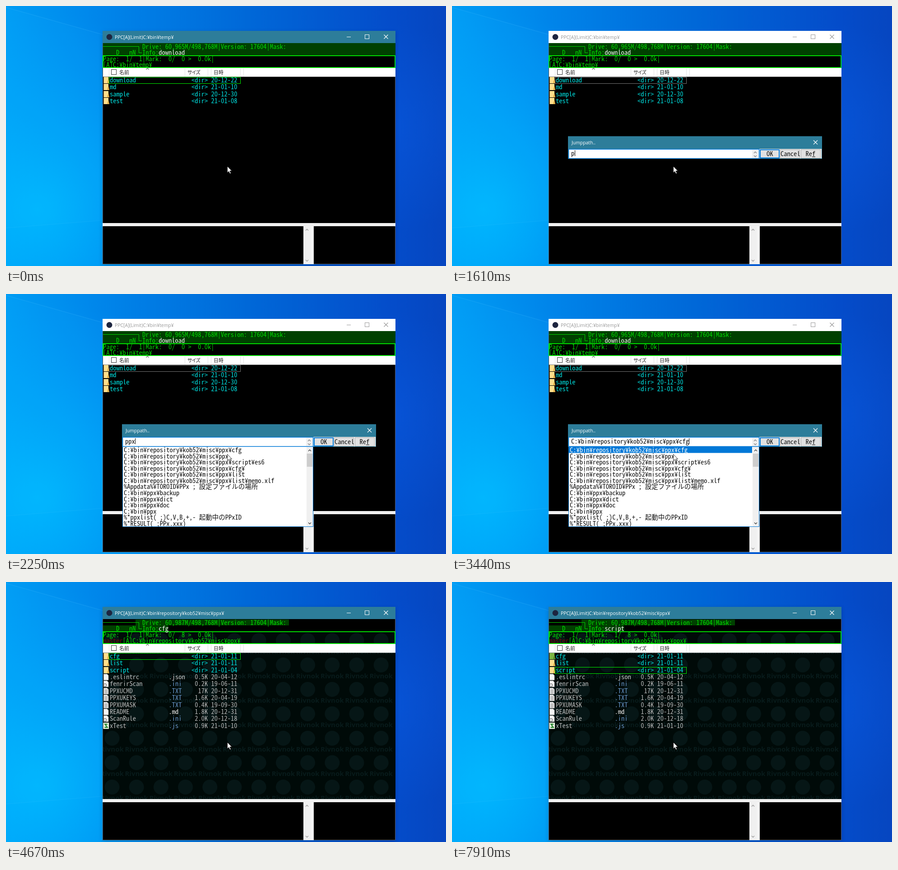
Animation, 975 px wide and 575 px high, one loop 8 s. Source, as an HTML page:

```html
<!DOCTYPE html>
<html lang="ja">
<head>
<meta charset="utf-8">
<title>Jump path</title>
<style>
html, body { margin: 0; width: 100%; height: 100%; overflow: hidden; background: #0060d0; }
svg { display: block; width: 975px; height: 575px; }
text { white-space: pre; }
.mono { font: 14.5px 'Noto Sans Mono CJK JP', 'Liberation Mono', monospace; }
.ui { font: 10.4px 'Open Sans', 'Noto Sans', sans-serif; }
.head { font: 10.9px 'Noto Sans CJK JP', 'Noto Sans CJK', sans-serif; }
.tile { font: bold 15px 'Open Sans', 'Noto Sans', sans-serif; text-anchor: middle; }
</style>
</head>
<body>
<svg id="stage" viewBox="0 0 975 575" lang="ja"></svg>
<script>
const LOOP = 8000, CELL = 7.25;
const GREEN = '#00d800', LIME = '#00f400', CYAN = '#00e0e0', GRAY = '#b8b8b8', BLUE = '#0078d7', TEAL = '#2d7d9a';
const OPEN = 500, JUMP = 4670;

const pen = document.createElement('canvas').getContext('2d');
pen.font = "14.5px 'Noto Sans Mono CJK JP', 'Liberation Mono', monospace";
const gap = (CELL - pen.measureText('0').width).toFixed(3);

const esc = s => s.replace(/&/g, '&amp;').replace(/</g, '&lt;');
const rect = (x, y, w, h, fill, more = '') =>
  `<rect x="${x}" y="${y}" width="${w}" height="${h}" fill="${fill}" ${more}/>`;
const frame = (x, y, w, h, color, line = 1) =>
  rect(x, y, w, h, 'none', `stroke="${color}" stroke-width="${line}"`);
const line = (d, color, w = 1) =>
  `<path d="${d}" fill="none" stroke="${color}" stroke-width="${w}"/>`;
const label = (kind, x, y, s, fill, more = '') =>
  `<text class="${kind}" x="${x}" y="${y}" fill="${fill}" ${more}>${esc(s)}</text>`;
const mono = (x, y, s, fill) => label('mono', x, y, s, fill, `letter-spacing="${gap}"`);
const during = (from, to, body) => `<g data-from="${from}" data-to="${to}">${body}</g>`;
const chevron = (x, y, dir, color, r = 3) =>
  line(`M${x - r} ${y + dir * r / 2}L${x} ${y - dir * r / 2}L${x + r} ${y + dir * r / 2}`, color, 1.3);

function desktop() {
  return `<defs>
    <linearGradient id="sky"><stop offset="0" stop-color="#009cf4"/><stop offset=".22" stop-color="#0085ea"/>
      <stop offset=".55" stop-color="#0068d8"/><stop offset=".88" stop-color="#044cca"/><stop offset="1" stop-color="#0646c0"/></linearGradient>
    <radialGradient id="glow" gradientUnits="userSpaceOnUse" cx="70" cy="450" r="440">
      <stop offset="0" stop-color="#00baff" stop-opacity=".9"/><stop offset="1" stop-color="#00a8ff" stop-opacity="0"/></radialGradient>
    <radialGradient id="edge" gradientUnits="userSpaceOnUse" cx="850" cy="270" r="230">
      <stop offset="0" stop-color="#0a5ce4" stop-opacity=".45"/><stop offset="1" stop-color="#0a5ce4" stop-opacity="0"/></radialGradient>
    <filter id="blur" x="-10%" y="-10%" width="120%" height="120%"><feGaussianBlur stdDeviation="5"/></filter>
    <clipPath id="files"><path d="M215 110H863V480H215Z"/></clipPath>
    <clipPath id="popup"><path d="M259 338H666V514H259Z"/></clipPath></defs>`
    + rect(0, 0, 975, 575, 'url(#sky)') + rect(0, 0, 975, 575, 'url(#glow)') + rect(0, 0, 975, 575, 'url(#edge)')
    + '<path d="M0 3L214 63V474L0 491Z" fill="#20b0ff" opacity=".06"/>'
    + line('M0 3L214 63', 'rgba(90,200,255,.16)', 1.5) + line('M0 491L214 474', 'rgba(90,205,255,.1)', 1.5);
}

function titleBar(title, active) {
  const ink = active ? '#fff' : '#999';
  return rect(214, 55, 649, 27, active ? TEAL : '#fff')
    + `<circle cx="229" cy="68.5" r="6.5" fill="#1d2540"/>`
    + label('ui', 241, 72.5, title, ink)
    + line('M755 68.5H764', ink) + frame(795.5, 63.5, 9, 9, ink)
    + line('M837.5 63.5L846.5 72.5M846.5 63.5L837.5 72.5', ink, 1.2);
}

function columns() {
  let s = rect(215, 137, 648, 19.5, '#fff') + frame(233.5, 140.5, 11, 11, '#333')
    + label('head', 251, 150.5, '名前', '#222')
    + label('head', 402, 150.5, 'サイズ', '#222', 'letter-spacing="-1.6"')
    + label('head', 460, 150.5, '日時', '#222') + chevron(313.5, 139, 1, '#777');
  for (const x of [228, 396, 447, 454, 519, 526]) s += line(`M${x + .5} 138V156`, '#e2e2e2');
  return s;
}

const rowTop = i => Math.round(156.8 + 15.4 * i);

function icon(kind, y) {
  if (kind === 'dir' || kind === 'marked') {
    const [base, fold] = kind === 'dir' ? ['#ffdf8c', '#e8b64c'] : ['#7db442', '#56902a'];
    return rect(216.5, y, 10.5, 14, base) + `<path d="M227 ${y + 5}L229 ${y + 14}H224.5V${y + 10}Z" fill="${fold}"/>`;
  }
  if (kind === '.js') {
    return rect(215.5, y, 12.5, 14, '#e8f0e0')
      + line(`M225 ${y + 3.5}H219.5L224.5 ${y + 10.5}H218.5`, '#2f8a35', 2.4);
  }
  let s = `<path d="M216.5 ${y + .5}H224L227 ${y + 3.5}V${y + 14}H216.5Z" fill="#f6f6f6" stroke="#999" stroke-width=".6"/>`;
  if (kind === '.TXT') for (let k = 4; k < 13; k += 2) s += line(`M218 ${y + k}H225.5`, '#777', .8);
  if (kind === '.ini') s += `<circle cx="219.5" cy="${y + 10}" r="3" fill="none" stroke="#888" stroke-width="1.6"/>`;
  return s;
}

function fileRow(i, name, ext, size, date) {
  const base = rowTop(i) + 11.8, dir = !ext;
  const tint = dir ? CYAN : GRAY;
  const extInk = { '.json': '#c8c8c8', '.md': '#f0f0f0' }[ext] || '#6795c8';
  return icon(dir ? 'dir' : ext, rowTop(i)) + mono(230, base, name, tint)
    + (dir ? '' : mono(360.5, base, ext, extInk))
    + mono(411, base, size.padStart(5) + ' ' + date, tint);
}
const rows = list => list.map((r, i) => fileRow(i, ...r.split('|'))).join('');
const cursorBox = (i, color) => frame(228.5, rowTop(i) + .5, 291, 14, color);

function infoText(drive, info) {
  return line('M215 89.5H294.5V103.5H301', GREEN)
    + mono(302, 94.5, `Drive: ${drive}M/498,768M|Version: 17604|Mask:`, GREEN)
    + mono(215, 107.8, '____D___nN', GREEN) + mono(302, 107.8, 'Info:', GREEN)
    + mono(338.2, 107.8, info, '#f4f4f4');
}
const pageText = (mark, count) =>
  mono(215, 121.6, `Page:  1/  1|Mark:  ${mark}/  ${count} >  0.0k|`, GREEN);
const pathBox = () => frame(214.9, 109.9, 647.2, 26.2, LIME, 1.8);

function firstFolder() {
  return rect(215, 82, 648, 28, '#004000') + infoText('60,965', 'download')
    + pageText(0, 0) + mono(215, 134.6, '[A]C:¥bin¥temp¥', GREEN) + pathBox()
    + rows(['download||<dir>|20-12-22', 'md||<dir>|21-01-10', 'sample||<dir>|20-12-30', 'test||<dir>|21-01-08'])
    + during(0, OPEN, cursorBox(0, LIME)) + during(OPEN, JUMP, cursorBox(0, '#777'));
}

function tiles() {
  let s = rect(215, 110, 648, 370, '#000a08');
  for (let r = 0; r < 7; r++) for (let c = 0; c < 12; c++) {
    const x = 235 + 54.2 * c, y = 129.5 + 54 * r;
    s += `<circle cx="${x}" cy="${y}" r="16.5" fill="#061616"/>` + label('tile', x, y + 29.5, 'Rivnok', '#081b1b');
  }
  return `<g clip-path="url(#files)">${s}</g>`;
}

function secondFolder() {
  const step = (from, to, i, name, mark) => during(from, to,
    rect(215, 96, 123 + name.length * CELL, 13, '#004000') + infoText('60,987', name)
    + pageText(mark, 8) + (mark ? icon('marked', rowTop(0)) : '') + cursorBox(i, LIME));
  return tiles() + rect(287, 83, 340, 13, '#004000')
    + mono(215, 134.6, 'master', '#6a0808') + mono(258.5, 134.6, '[A]C:¥bin¥repository¥kob52¥misc¥ppx¥', GREEN) + pathBox()
    + rows(['cfg||<dir>|21-01-11', 'list||<dir>|21-01-11', 'script||<dir>|21-01-04',
      '.eslintrc|.json|0.5K|20-04-12', 'fenrirScan|.ini|0.2K|19-06-11', 'PPXUCMD|.TXT|17K|20-12-31',
      'PPXUKEYS|.TXT|1.6K|20-04-19', 'PPXUMASK|.TXT|0.4K|19-09-30', 'README|.md|1.8K|20-12-31',
      'ScanRule|.ini|2.0K|20-12-18', 'xTest|.js|0.9K|21-01-10'])
    + step(JUMP, 6710, 0, 'cfg', 0) + step(6710, 7910, 1, 'list', 1) + step(7910, LOOP, 2, 'script', 1);
}

function lowerPane() {
  return rect(214, 480, 649, 7, '#f0f0f0') + rect(659, 487, 23, 84, '#f0f0f0')
    + line('M676.5 487V570', '#fff') + chevron(667, 495, 1, '#999') + chevron(667, 563, -1, '#999');
}

const PPX = 'C:¥bin¥repository¥kob52¥misc¥ppx';
const TEMP = 'C:¥bin¥temp';
const broad = [PPX + '¥cfg', PPX, TEMP + '¥test¥script¥', PPX + '¥script¥es6', TEMP + '¥test¥script¥js¥',
  TEMP + '¥test¥script¥compCode_es6.js¥', TEMP + '¥', TEMP, PPX + '¥cfg¥', TEMP + '¥md¥1226_1907¥',
  PPX + '¥list', PPX + '¥list¥memo.xlf', '#0:¥ ;デスクトップ'];
const narrow = [PPX + '¥cfg', PPX, PPX + '¥script¥es6', PPX + '¥cfg¥', PPX + '¥list', PPX + '¥list¥memo.xlf',
  '%Appdata%¥TOROID¥PPx ; 設定ファイルの場所', 'C:¥bin¥ppx¥backup', 'C:¥bin¥ppx¥dict', 'C:¥bin¥ppx¥doc',
  'C:¥bin¥ppx', '%*ppxlist( ;)C,V,B,+,- 起動中のPPxID', '%*RESULT( ;PPx.xxx)'];

function popup(from, to, items, thumb, picked = -1) {
  const text = items.map((s, i) => mono(261, 350 + 13.58 * i, s, i === picked ? '#fff' : '#111')).join('');
  const bar = picked < 0 ? '' : rect(259, 338 + 13.58 * picked, 406, 13.5, BLUE);
  return during(from, to, rect(258.5, 337.5, 422, 177, '#fff', `stroke="${BLUE}"`)
    + `<g clip-path="url(#popup)">${bar}${text}</g>`
    + rect(666, 338, 14, 176, '#f0f0f0') + rect(666.5, 353, 13, thumb, '#cdcdcd')
    + chevron(673, 346, 1, '#444') + chevron(673, 507, -1, '#444'));
}

const typed = (from, to, s) => during(from, to, mono(264, 331.3, s, '#111'));
const caret = (from, to, x) => during(from, to, rect(x, 319, 1, 13, '#000'));

function button(x, s, textX, main) {
  return (main ? rect(x + 1, 318, 42, 18, '#e1e1e1', `stroke="${BLUE}" stroke-width="2"`)
    : rect(x + .5, 317.5, 43, 19, '#e1e1e1', 'stroke="#adadad"')) + mono(textX, 332, s, '#111');
}

function dialog() {
  return rect(257.5, 288.5, 562, 49, '#f0f0f0', `stroke="${TEAL}"`) + rect(257, 288, 563, 28, TEAL)
    + label('ui', 265, 306, 'Jumppath..', '#fff')
    + line('M801 297L810 306M810 297L801 306', '#fff', 1.2)
    + rect(258.5, 316.75, 422, 20.5, '#fff', `stroke="${BLUE}" stroke-width="1.5"`)
    + rect(665, 318, 14, 18, '#f0f0f0') + chevron(672, 324, 1, '#888') + chevron(672, 332, -1, '#888')
    + button(682, 'OK', 697, true) + button(727, 'Cancel', 728) + button(773, 'Ref', 783.5)
    + line('M798 333.5H805', '#111')
    + during(OPEN, 1610, rect(263, 319, 52, 13, BLUE) + mono(264, 331.3, 'C:¥bin¥', '#fff'))
    + typed(1610, 1950, 'p') + typed(1950, 2250, 'pp') + typed(2250, 3440, 'ppx')
    + typed(3440, 3790, PPX + '¥cfg') + typed(3790, JUMP, PPX)
    + caret(OPEN, 1050, 315) + caret(1610, 1950, 272) + caret(1950, 2250, 279) + caret(2250, 2680, 286)
    + caret(3230, 3440, 286) + caret(3440, 3790, 525) + caret(3790, 4340, 496)
    + popup(1700, 1950, broad, 15) + popup(1950, 3440, narrow, 29)
    + popup(3440, 3790, narrow, 29, 0) + popup(3790, JUMP, narrow, 29, 1);
}

const shadow = rect(214, 58, 649, 516, '#002', 'opacity=".2" filter="url(#blur)"');
const stage = document.getElementById('stage');
stage.innerHTML = desktop()
  + during(0, OPEN, shadow) + during(JUMP, LOOP, shadow)
  + rect(214.5, 55.5, 648, 515, '#000', 'stroke="#555"')
  + during(0, OPEN, titleBar('PPC[A](Limit)C:¥bin¥temp¥', true))
  + during(OPEN, JUMP, titleBar('PPC[A](Limit)C:¥bin¥temp¥', false))
  + during(JUMP, LOOP, titleBar(`PPC[A](Limit)${PPX}¥`, true))
  + during(0, JUMP, firstFolder()) + during(JUMP, LOOP, secondFolder())
  + columns() + lowerPane()
  + during(OPEN, JUMP, dialog())
  + '<path transform="translate(490.5 354.5)" d="M0 0V14.2L3.3 11.2L5.6 16.4L7.9 15.4L5.6 10.3H10Z" fill="#fff" stroke="#000" stroke-width=".8"/>';

const parts = [...stage.querySelectorAll('[data-from]')].map(el => ({ el, from: +el.dataset.from, to: +el.dataset.to }));
const start = performance.now();
function draw() {
  const t = Math.max(0, performance.now() - start) % LOOP;
  for (const p of parts) p.el.style.display = t >= p.from && t < p.to ? '' : 'none';
  requestAnimationFrame(draw);
}
draw();
</script>
</body>
</html>
```
